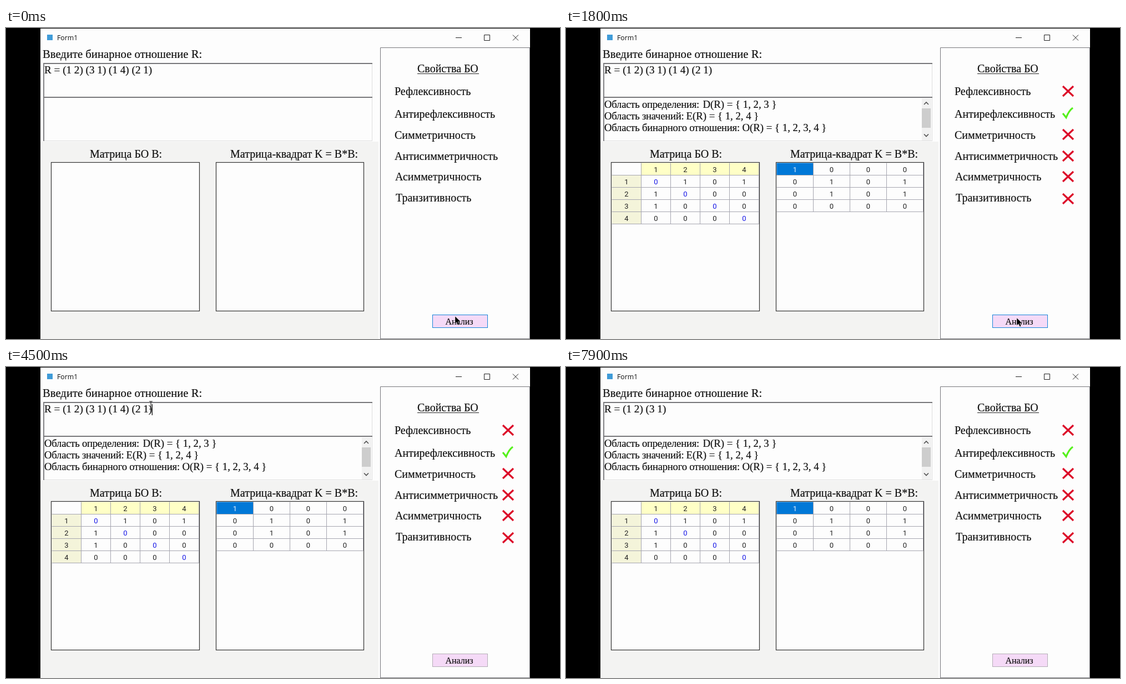
Write an HTML page that moves like this. It is 998 px wide and 561 px high and loops after 8 s.

```html
<!DOCTYPE html>
<html lang="ru">
<head>
<meta charset="utf-8">
<title>Form1</title>
<style>
  html, body { margin: 0; width: 100%; height: 100%; overflow: hidden; background: #000; }
  svg { display: block; width: 998px; height: 561px; }
  text { white-space: pre; fill: #111; }
  .serif { font-family: "Liberation Serif", "Times New Roman", serif; stroke: #111; stroke-width: .2; }
  .serif path { stroke-width: 1; }
  .label { font-size: 20px; }
  .caption { letter-spacing: -.24px; }
  .digit { font: 13px Roboto, "Liberation Sans", sans-serif; text-anchor: middle; }
  .line { fill: none; stroke: #222; stroke-width: 1; }
</style>
</head>
<body>
<svg id="stage" viewBox="0 0 998 561">
  <!-- window -->
  <rect x="62" y="1" width="882" height="560" fill="#fdfdfd"/>
  <rect x="62" y="205" width="609" height="356" fill="#f3f3f2"/>
  <rect x="74" y="12" width="10" height="10" fill="#3f9bd8"/>
  <text x="92" y="21.5" font-size="12.3" font-family="Open Sans, Noto Sans, sans-serif">Form1</text>
  <path class="line" d="M810 17.5h11M861.5 12.5h10v10h-10zM913 12.5l10 10m0-10l-10 10"/>

  <!-- properties panel -->
  <path d="M674.5 561V35.5H943M943.5 35V561M674 560.5H943" fill="none" stroke="#77777c"/>
  <g class="serif label" id="labels">
    <text x="66" y="53.7" style="font-size:20.7px">Введите бинарное отношение R:</text>
    <text x="151" y="234">Матрица БО B:</text>
    <text x="404" y="234">Матрица-квадрат K = B*B:</text>
    <text x="741" y="80">Свойства БО</text>
  </g>
  <path d="M741 82.5h111" stroke="#222"/>

  <!-- text boxes -->
  <rect x="67" y="63" width="593" height="141" fill="#fdfdfd"/>
  <path d="M659.5 64V204M67 203.5H660" fill="none" stroke="#dedede"/>
  <path d="M68 204V64H660M67 125H660" fill="none" stroke="#77777a" stroke-width="1.8"/>
  <text id="entry" class="serif" x="69" y="82.3" font-size="19.15"></text>
  <rect id="caret" y="67" width="1.3" height="20" fill="#111"/>

  <!-- matrix boxes -->
  <g fill="#fdfdfd" stroke="#333" stroke-width="1.2">
    <rect x="81.5" y="242.5" width="267" height="268"/>
    <rect x="378.5" y="242.5" width="266" height="268"/>
  </g>

  <g id="results">
    <g class="serif caption" font-size="18.7">
      <text x="69" y="144">Область определения:</text>
      <text x="69" y="164.7">Область значений:</text>
      <text x="69" y="185.5">Область бинарного отношения:</text>
    </g>
    <g class="serif" font-size="18.8">
      <text x="246.5" y="144">D(R) = { 1, 2, 3 }</text>
      <text x="216.5" y="164.7">E(R) = { 1, 2, 4 }</text>
      <text x="317.5" y="185.5">O(R) = { 1, 2, 3, 4 }</text>
    </g>
    <rect x="641" y="127" width="17" height="76" fill="#f1f1f1"/>
    <rect x="641" y="145" width="16" height="35" fill="#cdcdcd"/>
    <path d="M645 138l4-4 4 4M645 191.5l4 4 4-4" fill="none" stroke="#505050" stroke-width="1.6"/>
  </g>

  <!-- button -->
  <rect id="button" fill="#f5daf7"/>
  <text class="serif" x="816.5" y="534.5" font-size="16" text-anchor="middle">Анализ</text>

  <!-- pointers -->
  <path id="arrow" d="M0 0V13.5l3.2-3 2.3 5.2 2.3-1-2.3-5h4.4z" fill="#000" stroke="#fff" stroke-width=".4"/>
  <path id="beam" d="M-3-7h2.3q.7 0 .7.8V6.2q0 .8-.7.8H-3M3-7H.7Q0-7 0-6.2M3 7H.7Q0 7 0 6.2" fill="none" stroke="#222" stroke-width="1.1"/>
</svg>
<script>
const byId = id => document.getElementById(id);
const results = byId('results');

function setAll(el, attrs) {
  for (const key in attrs) el.setAttribute(key, attrs[key]);
}

function add(parent, tag, attrs, text) {
  const el = document.createElementNS('http://www.w3.org/2000/svg', tag);
  setAll(el, attrs);
  if (text !== undefined) el.textContent = text;
  return parent.appendChild(el);
}

const box = (x, y, width, height, fill) => add(results, 'rect', { x, y, width, height, fill });
const show = (el, on) => el.setAttribute('visibility', on ? 'visible' : 'hidden');

// Property names with their verdict marks
[
  ['Рефлексивность', 700, 120.5, 114],
  ['Антирефлексивность', 700, 161.5, 153],
  ['Симметричность', 700, 199.5, 192],
  ['Антисимметричность', 700, 237.5, 231],
  ['Асимметричность', 701, 275, 268],
  ['Транзитивность', 702, 313, 308]
].forEach(([name, x, y, markY], i) => {
  add(byId('labels'), 'text', { x, y }, name);
  const good = i === 1;
  add(results, 'path', {
    d: good ? `M895 ${markY + 1}l6 7.5Q906 ${markY - 4} 913 ${markY - 9}`
            : `M895 ${markY - 9}l19 18m0-18l-19 18`,
    fill: 'none', stroke: good ? '#55f01c' : '#dc0a28', 'stroke-width': 3.2
  });
});

// Matrices
const ROW = 22, TOP = 243.5;

function grid(left, cell, rows, color) {
  const cols = rows[0].length;
  const right = left + cell * cols, bottom = TOP + ROW * rows.length;
  let d = '';
  for (let c = 1; c <= cols; c++) d += `M${left + cell * c} ${TOP}V${bottom}`;
  for (let r = 1; r <= rows.length; r++) d += `M${left} ${TOP + ROW * r}H${right}`;
  add(results, 'path', { d, fill: 'none', stroke: '#a6a6b0' });
  rows.forEach((row, r) => [...row].forEach((digit, c) => add(results, 'text', {
    class: 'digit', x: left + cell * (c + .5), y: TOP + ROW * r + 16, style: `fill:${color(r, c)}`
  }, digit)));
}

box(135.5, TOP, 212, ROW, '#ffffc6');
box(82.5, TOP + ROW, 53, ROW * 4, '#f4f4da');
grid(82.5, 53, [' 1234', '10101', '21000', '31000', '40000'],
  (r, c) => r && r === c ? '#1414e6' : '#222');

box(379.5, TOP, 66, ROW, '#0078d7');
grid(379.5, 66, ['1000', '0101', '0101', '0000'],
  (r, c) => r || c ? '#222' : '#e8f4ff');

// Cells that are painted one moment later than the rest
const unpainted = [
  box(512, 310, 65, 23, '#fdfdfd'),
  box(578, 310, 66, 23, '#fdfdfd')
];

// Timeline in ms
const LOOP = 8000, SHOWN = 1300, PAINTED = 1400, LEAVE = 2000, FOCUS = 3100;
const FULL = 'R = (1 2) (3 1) (1 4) (2 1)';
const erases = [4700, 4950, 5200, 5400, 5700, 5900, 6100, 6300, 6600, 6900, 7100, 7300];
const path = [
  [0, 809, 520], [900, 812, 523], [1900, 812, 523], [2400, 271, 88],
  [2800, 271, 88], [3100, 266, 80], [3700, 261, 69], [LOOP, 261, 69]
];

function pointer(t) {
  const i = path.findIndex(p => p[0] > t);
  const [t0, x0, y0] = path[i - 1], [t1, x1, y1] = path[i];
  const k = (t - t0) / (t1 - t0), e = k * k * (3 - 2 * k);
  return [x0 + (x1 - x0) * e, y0 + (y1 - y0) * e];
}

function drawButton(t) {
  const focused = t < FOCUS;
  const w = focused && t >= LEAVE ? 2 : 1;
  setAll(byId('button'), {
    x: 768 + w / 2, y: 517 + w / 2, width: 100 - w, height: 24 - w,
    stroke: focused ? '#1684d8' : '#b4aeb6', 'stroke-width': w
  });
}

function draw(t) {
  show(results, t >= SHOWN);
  unpainted.forEach(el => show(el, t >= SHOWN && t < PAINTED));
  drawButton(t);

  const done = erases.filter(at => at <= t);
  const entry = byId('entry'), caret = byId('caret');
  entry.textContent = FULL.slice(0, FULL.length - done.length);
  caret.setAttribute('x', 69 + entry.getComputedTextLength() - .5);
  const lastInput = done.length ? done[done.length - 1] : FOCUS;
  show(caret, t >= FOCUS && (t - lastInput) % 1060 < 530);

  const [x, y] = pointer(t);
  const overText = x > 67 && x < 660 && y > 63 && y < 204;
  const typing = done.length > 0;
  for (const id of ['arrow', 'beam']) {
    byId(id).setAttribute('transform', `translate(${x} ${y})`);
    show(byId(id), !typing && overText === (id === 'beam'));
  }
}

const start = performance.now();
function tick() {
  const t = (performance.now() - start) % LOOP;
  draw(Math.floor(t / 100) * 100);
  requestAnimationFrame(tick);
}
tick();
</script>
</body>
</html>
```
